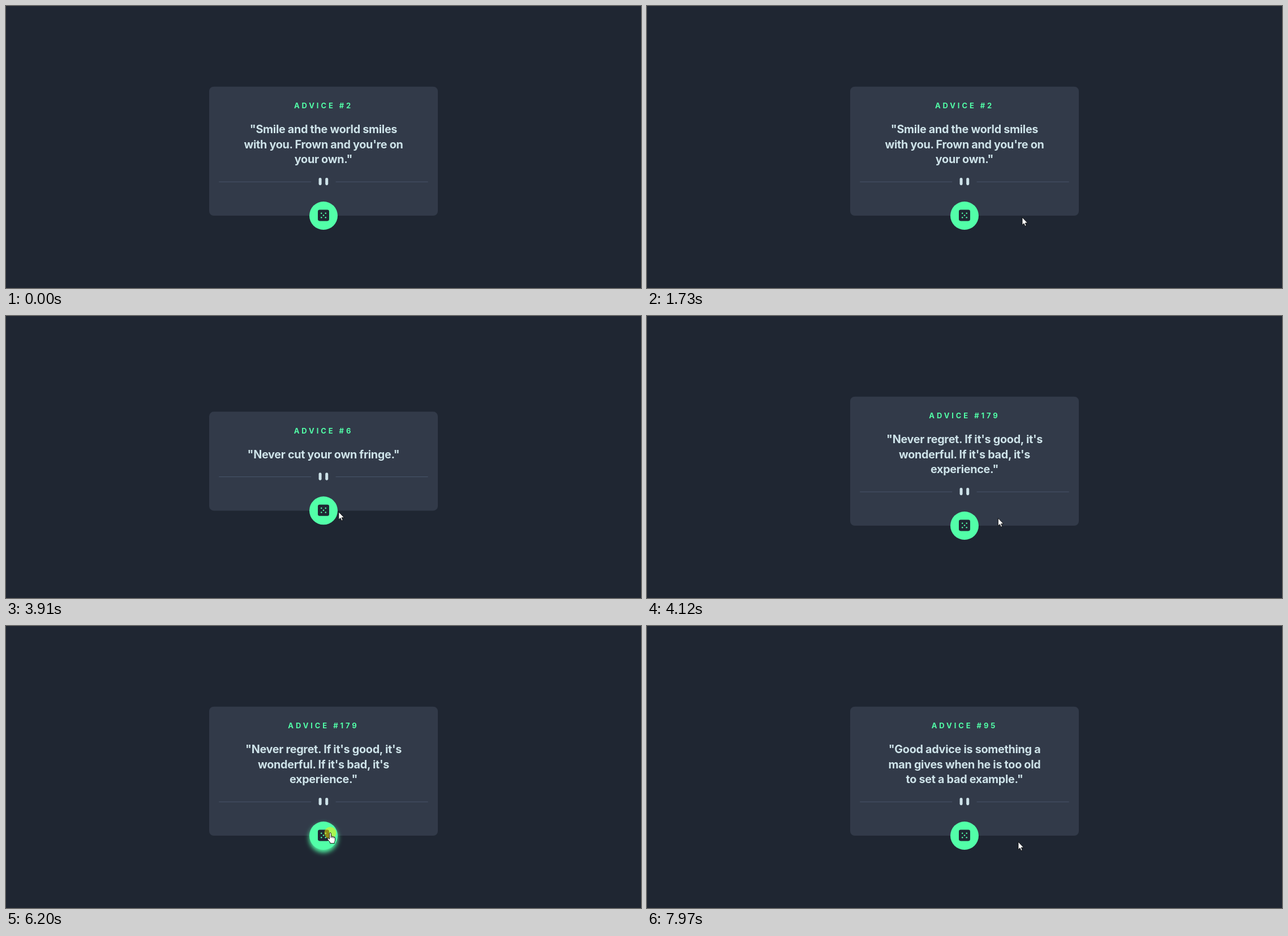
Recreate the animation shown at these times as an HTML page. Size 1122 by 499 pixels, loop 8000 ms.

```html
<!DOCTYPE html>
<html lang="en">
<head>
<meta charset="utf-8">
<title>Advice generator</title>
<style>
  html, body { margin: 0; width: 100%; height: 100%; overflow: hidden; background: #1f2632; }
  svg { display: block; width: 1122px; height: 499px; }
  text { font-family: Inter, "Open Sans", sans-serif; font-weight: 700; text-anchor: middle; }
  #title { font-size: 13px; letter-spacing: 3.9px; fill: #52ffa8; }
  #quote { font-size: 19.8px; letter-spacing: -.3px; fill: #cee3e9; }
</style>
</head>
<body>
<svg viewBox="0 0 1122 499">
  <defs>
    <filter id="blur" x="-50%" y="-50%" width="200%" height="200%">
      <feGaussianBlur stdDeviation="4"/>
    </filter>
  </defs>
  <rect id="card" x="359" width="404" rx="8" fill="#323a49"/>
  <text id="title" x="561"></text>
  <text id="quote"></text>
  <g id="divider">
    <path d="M0 8H196V9H0ZM248 8H444V9H248Z" fill="#4f5d74"/>
    <g fill="#cee3e9">
      <rect x="212" width="6" height="16" rx="3"/>
      <rect x="226" width="6" height="16" rx="3"/>
    </g>
  </g>
  <g id="button" fill="#52ffa8">
    <circle id="glow" cy="4.5" r="25" filter="url(#blur)"/>
    <circle r="25"/>
    <rect x="-10" y="-10.6" width="20" height="20" rx="3.3" fill="#202733"/>
    <g id="pips"></g>
  </g>
  <g id="cursor" stroke="#000" stroke-linejoin="round">
    <circle id="press" r="10.5" fill="#fe0" fill-opacity=".5" stroke="none"/>
    <path id="arrow" fill="#fff" stroke-width=".8"
      d="M0 0V13.5L3 10.8 5 15.5 7.2 14.6 5.2 10H9.5Z"/>
    <g id="hand" stroke-width=".9">
      <path fill="#fff" d="M-1.4 1.2a1.4 1.4 0 0 1 2.8 0V6.2q1.5-.9 2.6.5 1.5-.6 2.4.7 1.8-.4 2.1 1.6V13q0 2-1.2 3.4V18.6H-.3V17L-4.8 11.3q-.9-1.7.6-2.1 1.3 0 2.8 1.9Z"/>
      <path fill="none" d="M1.4 6V9M4 6.7V9.3M6.4 7.4V9.6"/>
    </g>
  </g>
</svg>
<script>
const LOOP = 8000, STEP = 70, PRESS = 130, LINE = 26.67;
const $ = id => document.getElementById(id);

const advice = [
  { from: 0, id: 2, text: '"Smile and the world smiles|with you. Frown and you\'re on|your own."' },
  { from: 1800, id: 6, text: '"Never cut your own fringe."' },
  { from: 4050, id: 179, text: '"Never regret. If it\'s good, it\'s|wonderful. If it\'s bad, it\'s|experience."' },
  { from: 6740, id: 95, text: '"Good advice is something a|man gives when he is too old|to set a bad example."' }
];

// The pointer enters from the corner, then makes eased trips between rests.
const entry = { x: 774, y: 450 };
const trips = [
  { start: 70, steps: 8, x: 574, y: 367 },
  { start: 1240, steps: 7, x: 663, y: 374 },
  { start: 1730, steps: 1, x: 661, y: 370 },
  { start: 3120, steps: 6, x: 574, y: 342 },
  { start: 3700, steps: 14, x: 692, y: 382 },
  { start: 5470, steps: 8, x: 573, y: 366 },
  { start: 6460, steps: 10, x: 717, y: 388 },
  { start: 7620, steps: 5, x: 656, y: 382 }
];
const presses = [900, 3560, 6200];

const ease = k => k * k * (3 - 2 * k);
const mix = (a, b, k) => a + (b - a) * k;

function pointerAt(time) {
  const i = trips.findLastIndex(trip => trip.start <= time);
  if (i < 0) return null;
  const trip = trips[i], last = trips[i - 1] || entry;
  const done = Math.floor((time - trip.start) / STEP);
  const k = ease(Math.min(1, done / trip.steps));
  return { x: mix(last.x, trip.x, k), y: mix(last.y, trip.y, k) };
}

const show = (id, on) => $(id).setAttribute('visibility', on ? 'visible' : 'hidden');
const move = (id, x, y, extra = '') => $(id).setAttribute('transform', `translate(${x} ${y}) ${extra}`);

// The card stays centred, so each missing line pulls both edges in by half.
function layOut(item) {
  const lines = item.text.split('|');
  const inset = (3 - lines.length) * LINE / 2;
  $('card').setAttribute('y', 142.7 + inset);
  $('card').setAttribute('height', 228.4 - 2 * inset);
  $('title').setAttribute('y', 181.3 + inset);
  $('title').textContent = `ADVICE #${item.id}`;
  $('quote').innerHTML = lines
    .map((line, i) => `<tspan x="561" y="${225 + inset + i * LINE}">${line}</tspan>`).join('');
  move('divider', 376.2, 304 - inset, 'scale(.832)');
  move('button', 561, 371 - inset);
  return { item, buttonY: 371 - inset };
}

let layout = {};
function draw(time) {
  const item = advice.findLast(a => a.from <= time);
  if (item !== layout.item) layout = layOut(item);
  const p = pointerAt(time);
  const hover = !!p && Math.hypot(p.x - 561, p.y - layout.buttonY) < 25;
  if (p) move('cursor', p.x, p.y);
  show('glow', hover);
  show('hand', hover);
  show('arrow', p && !hover);
  show('press', presses.some(from => time >= from && time < from + PRESS));
}

// Five pips: the centre and four corners.
for (let i = 0; i < 9; i += 2) {
  const x = (i % 3 - 1) * 3.75, y = (Math.floor(i / 3) - 1) * 3.75 - .6;
  $('pips').innerHTML += `<circle cx="${x}" cy="${y}" r="1.25"/>`;
}

const begin = performance.now();
function tick() {
  draw((performance.now() - begin) % LOOP);
  requestAnimationFrame(tick);
}
tick();
</script>
</body>
</html>
```
